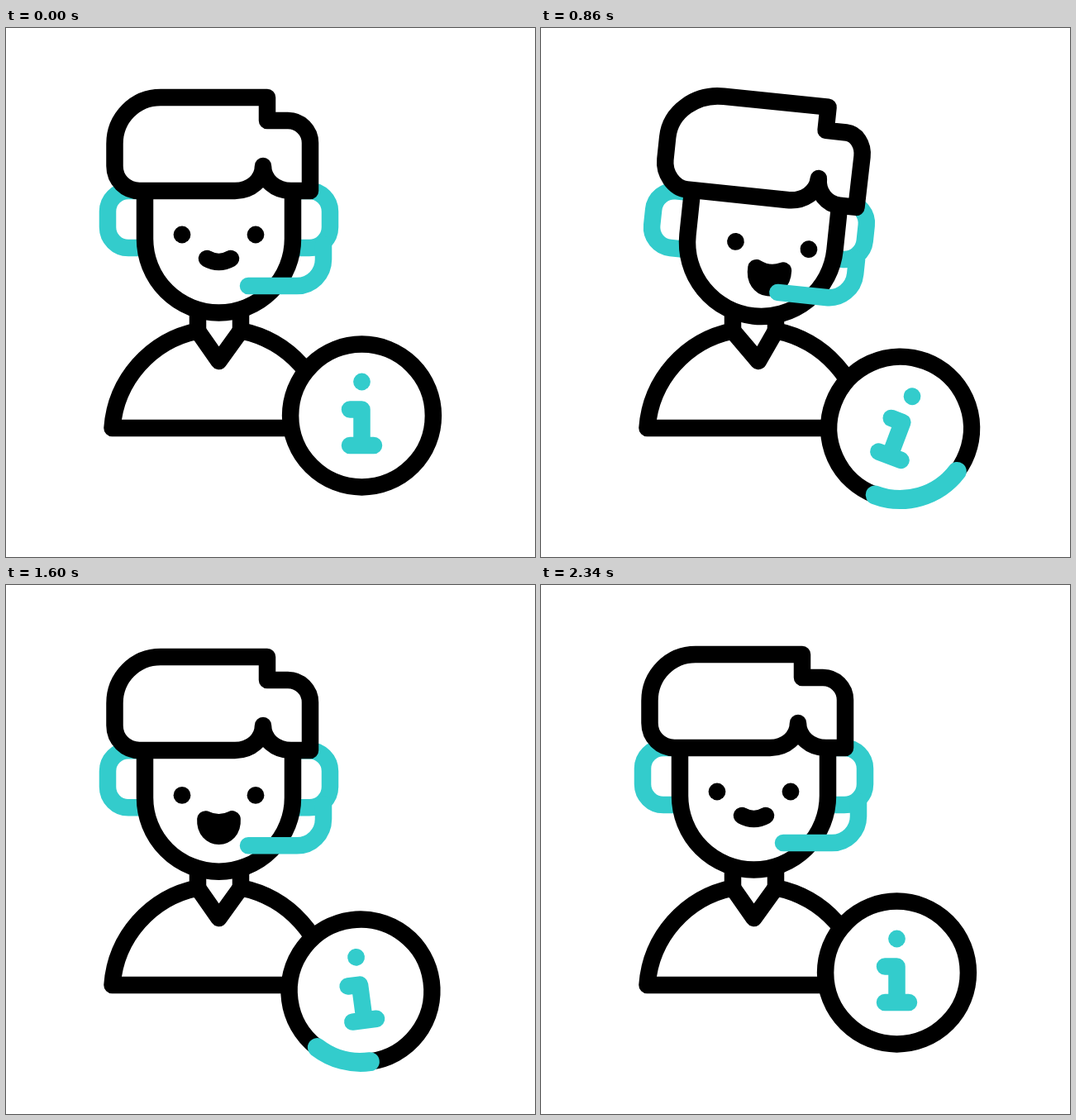
An HTML page with a canvas for the animation above (2.4 s loop, 640x640 px).

```html
<!DOCTYPE html>
<html lang="en">
<head>
<meta charset="utf-8">
<title>Help desk</title>
<style>
  html, body { margin: 0; width: 100%; height: 100%; overflow: hidden; background: #fff; }
  canvas { display: block; width: 640px; height: 640px; }
</style>
</head>
<body>
<canvas id="stage" width="640" height="640"></canvas>
<script>
const LOOP = 2400;
const INK = '#000', TEAL = '#33cccc', PAPER = '#fff';
const LINE = 20.5;
const RAD = Math.PI / 180;
const ctx = document.getElementById('stage').getContext('2d');

// Each track is a list of [time, value] pairs, eased between.
const tracks = {
  tilt: [[200, 0], [600, 1], [1100, 1], [1500, 0]],
  nod: [[1500, 0], [1860, 1.144], [2320, 0]],
  mouth: [[200, 4], [660, 30], [1020, 17], [1400, 27], [1960, 4]],
  badgeY: [[200, 0], [700, 28.2], [1213, -28], [1700, 28], [2300, 0]],
  badgeTurn: [[200, 0], [800, 22], [1400, -25], [1880, 21], [2340, 0]],
  arcHead: [[600, 0], [1500, 1]],
  arcTail: [[900, 0], [1800, 1]]
};

function at(name, t) {
  const keys = tracks[name];
  if (t <= keys[0][0]) return keys[0][1];
  for (let i = 1; i < keys.length; i++) {
    const [t0, a] = keys[i - 1], [t1, b] = keys[i];
    if (t < t1) {
      const u = (t - t0) / (t1 - t0);
      return a + (b - a) * u * u * (3 - 2 * u);
    }
  }
  return keys[keys.length - 1][1];
}

function draw(d, color = INK, fill) {
  const path = new Path2D(d);
  if (fill) {
    ctx.fillStyle = fill;
    ctx.fill(path);
  }
  ctx.strokeStyle = color;
  ctx.lineWidth = LINE;
  ctx.stroke(path);
}

function dot(x, y, r, color) {
  ctx.fillStyle = color;
  ctx.beginPath();
  ctx.arc(x, y, r, 0, 2 * Math.PI);
  ctx.fill();
}

function body(tilt) {
  draw('M232 338V367M284 338V367');
  draw('M128.5 484A129.5 129.5 0 0 1 232 366.5L' + (257.5 + 5.5 * tilt) +
    ' 403L284 366.3A132.5 129.5 0 0 1 389.7 484Z', INK, PAPER);
}

function hair(k) {
  const low = 197 + 3.6 * k;
  const cx = 316 + 5 * k, top = 84 - 0.5 * k;
  const tx = 311 + 7.4 * k, ty = 167 + 3.6 * k;
  const left = 187 + 7 * k, right = 368 - 0.6 * k;
  draw(`M${cx} ${top}L${left} 84C${156 + 4 * k} 84 131.5 109 131.5 140V167
    C131.5 184 145 ${low} 161.5 ${low}H${277 + 6 * k}
    C${tx - 15} ${low} ${tx} ${ty + 17} ${tx} ${ty}
    C${tx} ${ty + 17} ${tx + 15 - 2 * k} ${low} ${345 + 2 * k} ${low}
    H${right}L368 139A${27 - 5 * k} 27 0 0 0 ${341 + 5 * k} 112H${cx}Z`, INK, PAPER);
}

function mouth(depth) {
  const hw = 14.5 + 0.1 * (depth - 4);
  const cx = hw * (0.33 + 0.77 * Math.min(1, (depth - 4) / 12));
  const cy = 279 + depth * 4 / 3;
  draw(`M${257.5 - hw} 279Q257.5 287 ${257.5 + hw} 279
    C${257.5 + cx} ${cy} ${257.5 - cx} ${cy} ${257.5 - hw} 279Z`);
}

function head(t, k) {
  const n = at('nod', t);
  // Parts share one rotation but drift by different amounts, for depth.
  function part(dx, dy, drop, paint) {
    ctx.save();
    ctx.translate(257.5 + (9 + dx) * k, 255 + (4.5 + dy) * k + drop * n);
    ctx.rotate(6 * RAD * k);
    ctx.translate(-257.5, -255);
    paint();
    ctx.restore();
  }
  part(0, 7, 15, () =>
    draw('M172 197H148A25 25 0 0 0 123 222V241A25 25 0 0 0 148 266H172', TEAL));
  part(-10, -2, 15, () =>
    draw('M347 197H367A25 25 0 0 1 392 222V241A25 25 0 0 1 367 266H347', TEAL));
  part(0, 0, 10, () =>
    draw('M168 197V255A89.5 89.5 0 0 0 347 255V197', INK, PAPER));
  part(0, 0, 13.5, () => hair(k));
  part(12.7, 8.5, 20, () => {
    dot(213, 250, 10.4, INK);
    dot(302, 250, 10.4, INK);
    mouth(at('mouth', t));
  });
  part(-9.5, 0, 15, () =>
    draw('M384 262V280A32 32 0 0 1 352 312H293', TEAL));
}

function badge(t) {
  const turn = at('badgeTurn', t);
  ctx.save();
  ctx.translate(430.5 + 0.2 * turn, 469 + at('badgeY', t));
  ctx.rotate(turn * RAD);
  ctx.lineWidth = LINE;
  ctx.strokeStyle = INK;
  ctx.fillStyle = PAPER;
  ctx.beginPath();
  ctx.arc(0, 0, 86.4, 0, 2 * Math.PI);
  ctx.fill();
  ctx.stroke();
  if (t > 600 && t < 1800) {
    const angle = f => (90 - 360 * f) * RAD;
    ctx.lineWidth = 23;
    ctx.strokeStyle = TEAL;
    ctx.beginPath();
    ctx.arc(0, 0, 86.4, angle(at('arcTail', t)), angle(at('arcHead', t)), true);
    ctx.stroke();
  }
  dot(0, -41, 10.4, TEAL);
  draw('M-14.5 -7.5H0V36M-14.5 36H14.5', TEAL);
  ctx.restore();
}

function frame(now) {
  const t = now % LOOP;
  const tilt = at('tilt', t);
  ctx.fillStyle = PAPER;
  ctx.fillRect(0, 0, 640, 640);
  ctx.lineCap = ctx.lineJoin = 'round';
  body(tilt);
  head(t, tilt);
  badge(t);
}

const start = performance.now();
function tick() {
  frame(performance.now() - start);
  requestAnimationFrame(tick);
}
tick();
</script>
</body>
</html>
```
